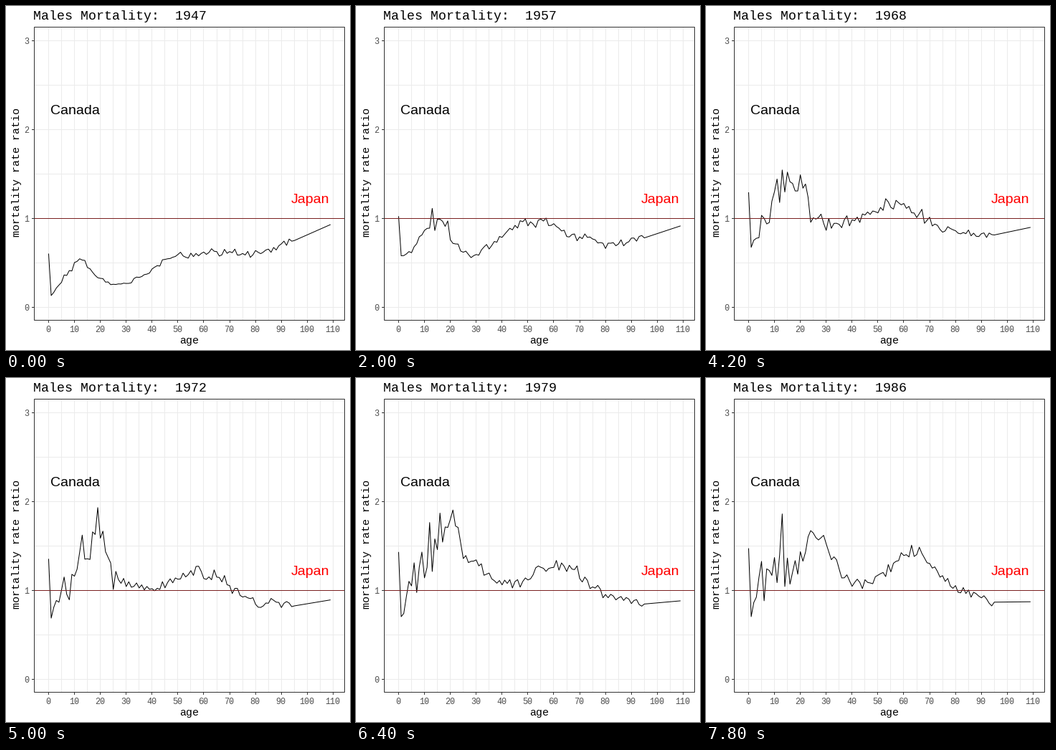
A matplotlib script for the animation above (8000 ms loop, 480 px wide and 480 px high).

```python
import math

import numpy as np
import matplotlib.pyplot as plt
from matplotlib.animation import FuncAnimation
from matplotlib.patches import Rectangle

SIZE, DPI = 480, 100
PX = 72 / DPI
FIRST, LAST, STEP_MS = 1947, 1986, 200
LEFT, RIGHT, TOP, BOTTOM = 39.5, 472.5, 29.5, 438.5
GRID, DARK, LABEL, PARITY = "#ebebeb", "#333333", "#4d4d4d", "#7a1f1f"
AGES = np.arange(110)


def to_x(age):
    return 59.45 + 3.609 * age


def to_y(ratio):
    return 420.2 - 123.9 * ratio


def crisp(v):
    """Centre of the pixel that holds v."""
    return math.floor(v) + 0.5


def trend(u):
    """Smooth ratio by age, u years after the start."""
    def rise(start, end, tau):
        return end - (end - start) * math.exp(-u / tau)

    youth_peak = math.exp(-((u - 29) / 11) ** 2)
    knots = {
        0: rise(0.61, 1.6, 18),
        1: rise(0.13, 0.71, 7),
        5: rise(0.30, 1.6, 35),
        12: rise(0.55, 1.6, 18),
        19: rise(0.33, 0.9, 4) + youth_peak,
        25: 0.25 + 0.036 * u,
        30: 0.27 + 0.031 * u,
        38: rise(0.37, 1.15, 14),
        47: rise(0.58, 1.1, 9),
        57: rise(0.60, 1.4, 15),
        65: 0.62 + 0.021 * u,
        80: 0.60 + 0.011 * u,
        95: 0.75 + 0.003 * u,
        109: 0.93 - 0.0015 * u,
    }
    return np.interp(AGES, list(knots), list(knots.values()))


def ratios(year):
    """Trend plus yearly scatter, strongest at young ages and none in the tail."""
    u = year - FIRST
    young = 0.04 + 0.0025 * u
    spread = np.interp(AGES, [1, 4, 15, 32, 94, 95],
                       [0.01, young, young, 0.035, 0.035, 0])
    noise = np.random.default_rng(year).normal(0, 1, AGES.size).clip(-2, 2)
    return trend(u) * (1 + spread * noise)


fig = plt.figure(figsize=(SIZE / DPI, SIZE / DPI), dpi=DPI, facecolor="white")
ax = fig.add_axes([0, 0, 1, 1])
ax.set(xlim=(0, SIZE), ylim=(SIZE, 0))
ax.axis("off")


def line(xs, ys, color, z=1):
    return ax.plot(xs, ys, color=color, lw=PX, zorder=z, snap=False,
                   solid_capstyle="butt")[0]


def vline(x, y0, y1, color):
    line([crisp(x)] * 2, [y0, y1], color)


def hline(y, x0, x1, color, z=1):
    line([x0, x1], [crisp(y)] * 2, color, z)


def label(x, y, text, size, color="black", font="Liberation Mono", **kw):
    kw = {"ha": "center", "va": "baseline", **kw}
    return ax.text(x, y, text, fontsize=size * PX, color=color, family=font,
                   zorder=5, **kw)


for age in range(0, 111, 5):
    vline(to_x(age), TOP, BOTTOM, GRID)
for half in range(7):
    hline(to_y(half / 2), LEFT, RIGHT, GRID)
for age in range(0, 111, 10):
    vline(to_x(age), BOTTOM, BOTTOM + 3.5, DARK)
    label(to_x(age) - 0.8, 455, str(age), 11.7, LABEL)
for ratio in range(4):
    hline(to_y(ratio), LEFT - 3.5, LEFT, DARK)
    label(32.5, to_y(ratio) + 5, str(ratio), 11.7, LABEL, ha="right")

hline(to_y(1), LEFT, RIGHT, PARITY, 3)
ax.add_patch(Rectangle((LEFT, TOP), RIGHT - LEFT, BOTTOM - TOP, fill=False,
                       ec=DARK, lw=PX, zorder=4, snap=False))
label(255.5, 471, "age", 15)
label(15.5, 232.5, "mortality rate ratio", 15, rotation=90, va="center")
label(96, 151, "Canada", 19.5, font="Liberation Sans")
label(424.5, 275, "Japan", 19.5, "red", "Liberation Sans")
title = label(38.5, 19, "", 18.3, ha="left")
curve = line(to_x(AGES), to_y(ratios(FIRST)), "black", 2)


def draw(i):
    year = FIRST + i
    title.set_text(f"Males Mortality:  {year}")
    curve.set_ydata(to_y(ratios(year)))
    return title, curve


anim = FuncAnimation(fig, draw, frames=LAST - FIRST + 1, interval=STEP_MS,
                     repeat=True, repeat_delay=0)
plt.show()
```
